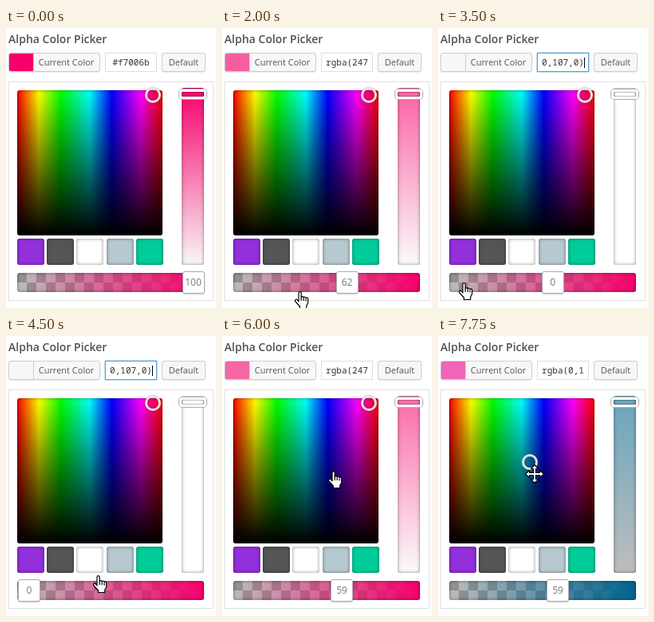
These frames come from a looping animation (263x351 px, 8 s). An HTML page:

```html
<!DOCTYPE html>
<html lang="en">
<head>
<meta charset="utf-8">
<title>Alpha Color Picker</title>
<style>
html, body { margin: 0; width: 100%; height: 100%; overflow: hidden; background: #fff; }
body { position: relative; font: 11px/22px "Open Sans", sans-serif; color: #555; }
div, svg { position: absolute; box-sizing: border-box; }
.title { left: 3px; top: 4px; font: 600 14px/20px "Open Sans", sans-serif; white-space: nowrap; color: #505050; }
.button { top: 31px; height: 24px; border: 1px solid #ccc; border-radius: 3px; background: #f7f7f7;
  box-shadow: 0 1px 0 rgba(0,0,0,.08); text-align: center; overflow: hidden; white-space: nowrap; }
#current { left: 3px; width: 115px; padding-left: 30px; }
#swatch { left: 0; top: 0; width: 31px; height: 22px; border-right: 1px solid #ccc; }
#default { left: 195px; width: 55px; }
#input { left: 124px; top: 31px; width: 65px; height: 24px; border: 1px solid #ddd; text-align: center;
  font: 11px/22px "Noto Sans Mono", "DejaVu Sans Mono", monospace; color: #333; white-space: nowrap; }
#input.focus { border-color: #5b9dd9; box-shadow: 0 0 2px rgba(30,140,190,.8); }
#caret { left: 58px; top: 5px; width: 1px; height: 13px; background: #000; }
#panel { left: 3px; top: 67px; width: 257px; height: 275px; border: 1px solid #dfdfdf; }
.well { border-radius: 3px; box-shadow: inset 0 0 4px rgba(0,0,0,.45); }
#square { left: 14px; top: 78px; width: 182px; height: 182px;
  background: linear-gradient(transparent, #000),
    linear-gradient(90deg, #f00, #ff0 15%, #0f0 30%, #0ff 50%, #00f 65%, #f0f 85%, #f00); }
#strip { left: 220px; top: 75px; width: 28px; height: 222px; }
#knob { left: 217px; top: 77px; width: 34px; height: 12px; border: 3px solid #fff; border-radius: 4px;
  box-shadow: 0 0 0 1px #aaa, inset 0 0 0 1px rgba(0,0,0,.25); }
.chip { top: 264px; width: 34px; height: 33px; }
#alpha { left: 14px; top: 307px; width: 234px; height: 24px; }
#handle { top: 305px; width: 28px; height: 28px; border: 1px solid #aaa; border-radius: 3px; background: #fff;
  box-shadow: 0 1px 2px rgba(0,0,0,.2); text-align: center; font-size: 12px; line-height: 26px; color: #777; }
#ring { width: 20px; height: 20px; border: 3px solid #e2e2e2; border-radius: 50%;
  box-shadow: 0 0 1px rgba(0,0,0,.5), inset 0 0 2px rgba(0,0,0,.6); }
#hand, #move { overflow: visible; fill: #fff; stroke: #000; stroke-width: 1.2; stroke-linejoin: round; }
</style>
</head>
<body>
<div class="title">Alpha Color Picker</div>
<div id="current" class="button"><div id="swatch"></div>Current Color</div>
<div id="input"><span id="value"></span><div id="caret"></div></div>
<div id="default" class="button">Default</div>
<div id="panel"></div>
<div id="square" class="well"></div>
<div id="strip" class="well"></div>
<div id="knob"></div>
<div id="alpha" class="well"></div>
<div id="handle"></div>
<div id="ring"></div>
<svg id="hand" width="18" height="22">
  <path d="M5 13V2.2a1.6 1.6 0 0 1 3.2 0V8a1.5 1.5 0 0 1 3 .2a1.5 1.5 0 0 1 2.9 .6a1.4 1.4 0 0 1 2.6 .9V14.5l-2 4V21.5H6.5V19L1 13a1.6 1.6 0 0 1 2.4-2.2z"/>
  <path d="M8.2 8v4M11.2 8.5v3.5M14.1 9.5v3" fill="none"/>
</svg>
<svg id="move" width="1" height="1">
  <path d="M0-11.5L4.5-6.5H1.5V-1.5H6.5V-4.5L11.5 0L6.5 4.5V1.5H1.5V6.5H4.5L0 11.5L-4.5 6.5H-1.5V1.5H-6.5V4.5L-11.5 0L-6.5-4.5V-1.5H-1.5V-6.5H-4.5z"/>
</svg>
<script>
const LOOP = 8000, STEP = 250, LAG = 750;
const el = id => document.getElementById(id);

// Each key: [time, values...]
const PERCENT = [[0, 100], [1000, 62], [3500, 0], [5000, 59]];
const SLIDES = [[1000, 234.5, 156.5], [3500, 156.5, 29], [5000, 29, 150]];
const HAND = [[500, 190, 338], [750, 160, 328], [1000, 150, 322], [1250, 152, 322], [1500, 158, 326],
  [1750, 175, 330], [2000, 91, 330], [2250, 50, 326], [2500, 17, 321], [2750, 26, 319],
  [4000, 26, 319], [4500, 109, 300], [4750, 135, 312], [5000, 143, 319], [5250, 143, 319],
  [5500, 143, 313], [5750, 140, 245], [6000, 133, 169], [6250, 190, 67]];
const BASE = { x: 14 + 182 * 334 / 360, y: 78 + 182 * (1 - 247 / 255) };
const RING = [[6750, BASE.x, BASE.y], [7000, 178, 92], [7250, 166, 109.4], [7500, 140, 135], [7750, 114, 158]];

const held = (keys, t) => keys.findLast(k => k[0] <= t);

function along(keys, t) {
  const i = keys.findIndex(k => k[0] > t);
  if (i < 0) return keys.at(-1).slice(1);
  if (i === 0) return keys[0].slice(1);
  const a = keys[i - 1], b = keys[i], p = (t - a[0]) / (b[0] - a[0]);
  return [1, 2].map(n => a[n] + (b[n] - a[n]) * p);
}

// The handle swings to the clicked value in 400 ms
function handleX(t) {
  const slide = held(SLIDES, t);
  if (!slide) return SLIDES[0][1];
  const p = Math.min(1, (t - slide[0] + 82) / 400);
  return slide[1] + (slide[2] - slide[1]) * (0.5 - Math.cos(p * Math.PI) / 2);
}

// Hue runs across the square, brightness runs up it
function colorAt([x, y]) {
  const hue = (x - 14) / 182 * 6, value = 255 * (1 - (y - 78) / 182);
  return [5, 3, 1].map(n => {
    const k = (n + hue) % 6;
    return Math.round(value * (1 - Math.max(0, Math.min(k, 4 - k, 1))));
  });
}

const rgba = (c, a) => `rgba(${[...c, a]})`;
const hex = c => "#" + c.map(n => n.toString(16).padStart(2, "0")).join("");

function place(id, x, y) {
  el(id).style.left = x + "px";
  el(id).style.top = y + "px";
}

function draw(t) {
  const percent = held(PERCENT, t)[1], a = percent / 100;
  const spot = along(RING, t), color = colorAt(spot);
  const gray = Array(3).fill(Math.max(...color));
  const focus = t >= 3500 && t < 5000;
  const text = rgba(color, a);

  el("swatch").style.background = rgba(colorAt(along(RING, t - LAG)), a);
  el("value").textContent = percent === 100 ? hex(color) : focus ? text.slice(-8) : text.slice(0, 8);
  el("input").className = focus ? "focus" : "";
  el("caret").hidden = !focus;
  el("strip").style.background = `linear-gradient(${rgba(color, a)}, ${rgba(gray, a)})`;
  el("alpha").style.background = `linear-gradient(90deg, ${rgba(color, 0)}, ${rgba(color, 1)}),
    repeating-conic-gradient(#bcbcbc 0 25%, #939393 0 50%) 0 0 / 24px 24px`;
  el("handle").textContent = percent;
  el("handle").style.left = handleX(t) - 14 + "px";
  place("ring", spot[0] - 9, spot[1] - 10);

  const dragging = t >= 6500;
  el("hand").style.display = t < 500 || dragging ? "none" : "";
  el("move").style.display = dragging ? "" : "none";
  place("hand", ...along(HAND, t < 4500 ? Math.min(t, 4000) : t));
  place("move", spot[0] + 7, spot[1] + 15);
}

["#9230db", "#555", "#fff", "#b6c8d0", "#00cc99"].forEach((color, i) => {
  const chip = document.createElement("div");
  chip.className = "chip well";
  chip.style.left = 14 + Math.round(i * 37.2) + "px";
  chip.style.background = color;
  el("panel").after(chip);
});

const start = performance.now();
function tick() {
  const t = (performance.now() - start) % LOOP;
  draw(Math.floor(t / STEP) * STEP);
  requestAnimationFrame(tick);
}
tick();
</script>
</body>
</html>
```
